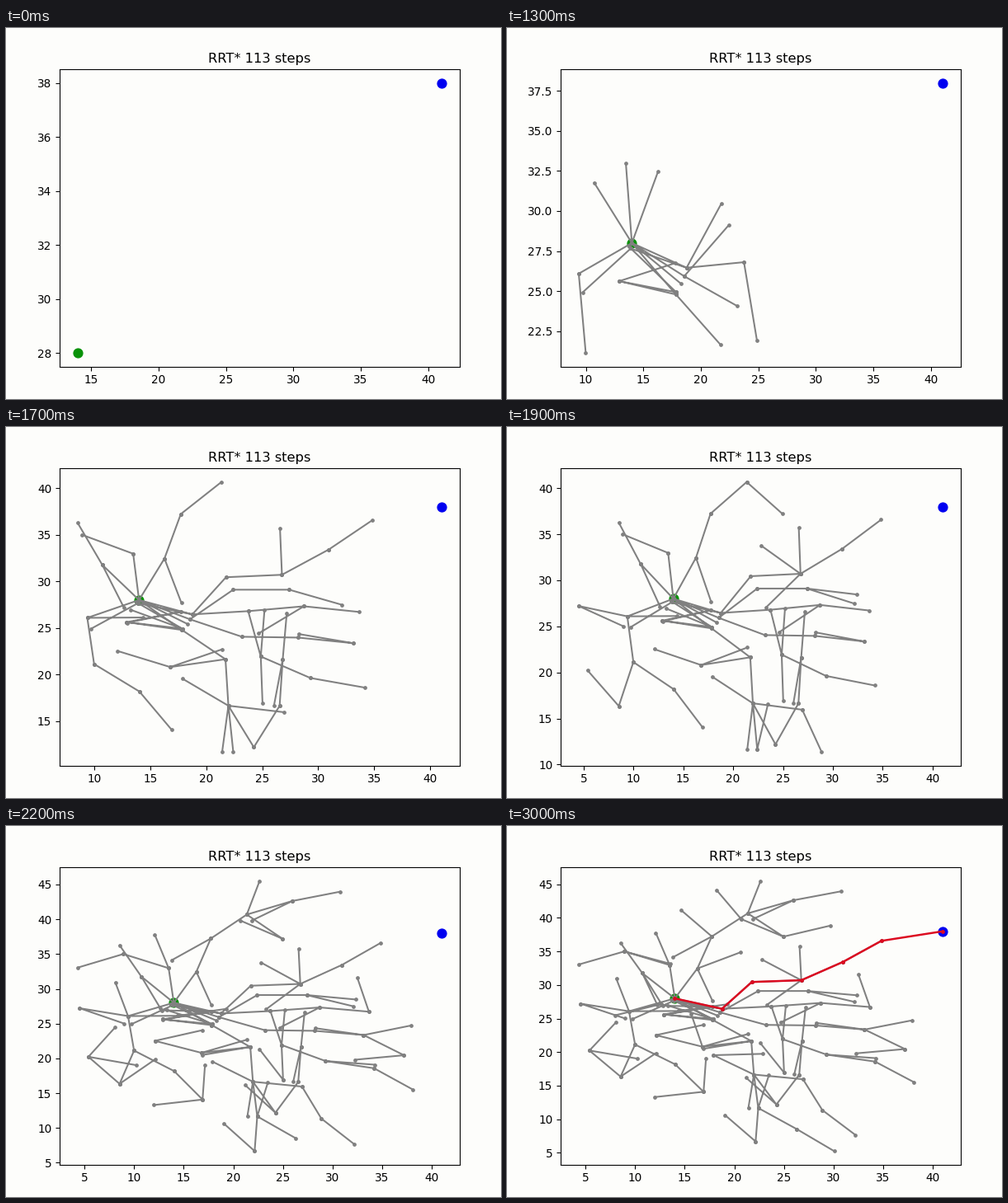
These frames come from a looping animation (600x450 px, 4000 ms). A matplotlib script:

```python
import numpy as np
import matplotlib.pyplot as plt
from matplotlib.animation import FuncAnimation

SCALE = 0.977          # drawing scale of fonts and strokes
STEP = 5.0             # length of one tree edge
START, GOAL = (14, 28), (41, 38)
BACK = "#fdfdfb"
GREY, GREEN, BLUE, RED = "#808080", "#089208", "#0000f0", "#dc0a20"
STAGE_TICKS = [10, *range(12, 18), *range(19, 24)]   # in tenths of a second
LAST_STAGE = len(STAGE_TICKS)

plt.rcParams.update({
    "font.family": "DejaVu Sans",
    "font.size": 10 * SCALE,
    "axes.titlesize": 12 * SCALE,
    "axes.titlepad": 6 * SCALE,
    "axes.linewidth": 0.8 * SCALE,
})

nodes, parents, births = [np.array(START, float)], [0], [0]


def extend(parent, angle, birth):
    """Add a node one step away from its parent and return its index."""
    nodes.append(nodes[parent] + STEP * np.array([np.cos(angle), np.sin(angle)]))
    parents.append(parent)
    births.append(birth)
    return len(nodes) - 1


def bough(parent, birth, pace, *headings):
    """Grow a chain along headings in degrees, one node every pace stages."""
    chain = []
    for k, heading in enumerate(headings):
        parent = extend(parent, np.radians(heading), birth + k * pace)
        chain.append(parent)
    return chain


def alive(stage):
    return [i for i, birth in enumerate(births) if birth <= stage]


def fill_with_twigs(stage, total, rng):
    """Extend the nearest node towards random samples inside the tree's extent."""
    while len(alive(stage)) < total:
        present = alive(stage)
        points = np.array([nodes[i] for i in present])
        low, high = points.min(axis=0), points.max(axis=0)
        turn, radius = rng.uniform(0, 2 * np.pi), np.sqrt(rng.uniform())
        offset = radius * np.array([np.cos(turn), np.sin(turn)])
        sample = (low + high) / 2 + (high - low) / 2 * offset
        nearest = np.hypot(*(points - sample).T).argmin()
        dx, dy = sample - points[nearest]
        angle = np.arctan2(dy, dx)
        tip = points[nearest] + STEP * np.array([np.cos(angle), np.sin(angle)])
        if np.all(tip >= low) and np.all(tip <= high):
            extend(present[nearest], angle, stage)


# Main boughs; everything else grows from random samples.
east = bough(0, 1, 2, -24.5, -22, -1, -7, 16)
main = bough(0, 2, 1, -18, 53, 3, 33, 39)
middle = bough(main[0], 3, 1, 4, 6, -7)
bough(middle[0], 3, 2, -77, -27.5, -12, -38)
bough(east[0], 3, 1, 39.5, 0, -19)
south = bough(0, 2, 1, -40, -39, -87, -63)
bough(south[2], 7, 1, -8, -67, -48)
bottom = bough(south[2], 7, 3, -85, -93)
bough(bottom[0], 9, 3, -39, -41)
north = bough(0, 3, 2, 63, 73, 43.5, 23, 15.5)
bough(north[2], 10, 1, 75)
west = bough(0, 2, 6, 202.5, 167)
bough(west[0], 3, 5, -83, -107)
northwest = bough(0, 3, 2, 96, 156)
bough(northwest[1], 10, 1, 203)
bough(0, 3, 4, 131, 116)

random_source = np.random.default_rng(3)
for stage_number in range(2, LAST_STAGE + 1):
    fill_with_twigs(stage_number, 10 * stage_number - 8, random_source)


def path_to_goal(node):
    """Follow the parents from the node next to the goal back to the start."""
    path = [GOAL, nodes[node]]
    while node:
        node = parents[node]
        path.append(nodes[node])
    return np.array(path)


def edges(indices):
    """Polyline of the edges that end at the given nodes, split by gaps."""
    gap = (np.nan, np.nan)
    points = [p for i in indices if i
              for p in (nodes[parents[i]], nodes[i], gap)]
    return np.array(points).reshape(-1, 2).T


def limits(values):
    low, high = min(values), max(values)
    margin = 0.05 * (high - low)
    return low - margin, high + margin


fig = plt.figure(figsize=(6, 4.5), dpi=100, facecolor=BACK)
ax = fig.add_axes([64.9 / 600, 39.3 / 450, 485 / 600, 360.4 / 450],
                  facecolor=BACK)
ax.set_title("RRT* 113 steps")
ax.tick_params(length=3.5 * SCALE, width=0.8 * SCALE, pad=3.5 * SCALE)

for point, color in ((START, GREEN), (GOAL, BLUE)):
    ax.plot(*point, "o", color=color, ms=8 * SCALE, mew=SCALE)

edge_style = dict(marker=".", ms=5 * SCALE, mew=SCALE)
tree, = ax.plot([], [], color=GREY, lw=1.5 * SCALE, **edge_style)
route, = ax.plot([], [], color=RED, lw=1.8 * SCALE, **edge_style)
best_path = path_to_goal(main[-1]).T


def update(tick):
    stage = np.searchsorted(STAGE_TICKS, tick, side="right")
    present = alive(stage)
    tree.set_data(*edges(present))
    route.set_data(*(best_path if stage == LAST_STAGE else ([], [])))
    xs, ys = np.array([nodes[i] for i in present] + [GOAL]).T
    ax.set_xlim(limits(xs))
    ax.set_ylim(limits(ys))
    return tree, route


anim = FuncAnimation(fig, update, frames=40, interval=100, repeat=True)
plt.show()
```
